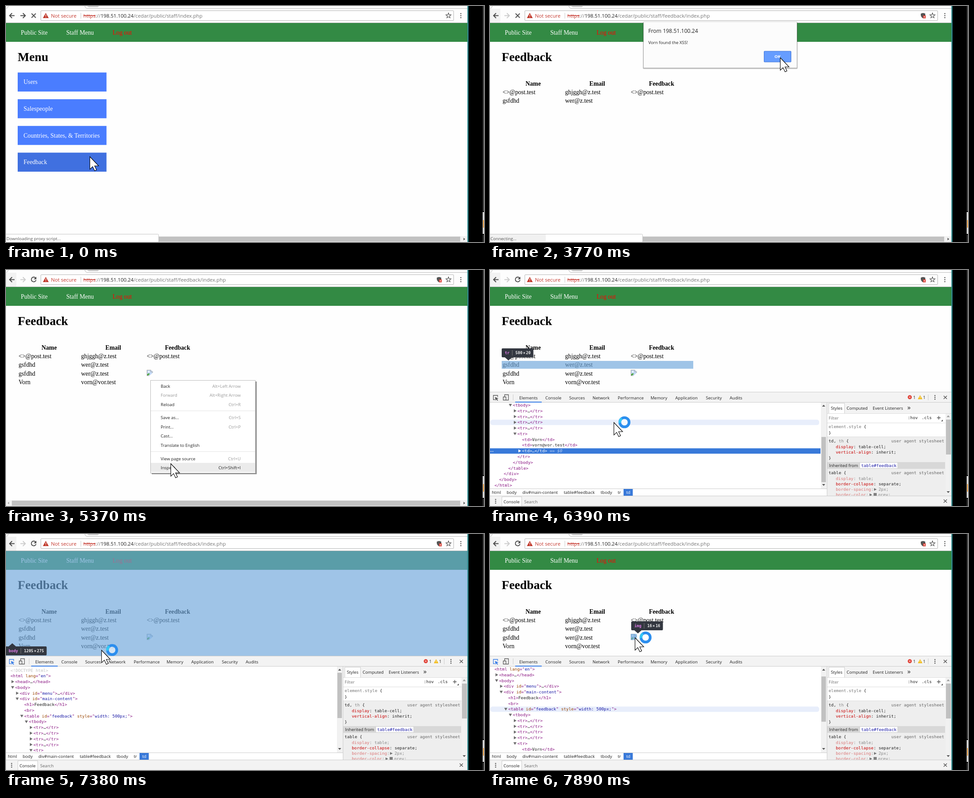
An HTML page that plays this animation: 1063 by 527 pixels, repeating every 8 s.

```html
<!DOCTYPE html>
<html lang="en">
<head>
<meta charset="utf-8">
<title>Staff feedback</title>
<style>
html, body { margin: 0; width: 100%; height: 100%; overflow: hidden; background: #fff; }
#stage { display: block; width: 1063px; height: 527px; }
text { font: 9.55px 'Open Sans', sans-serif; fill: #222; white-space: pre; }
.page { font: 13.63px 'Liberation Serif', serif; fill: #000; }
.head { font: bold 27.26px 'Liberation Serif', serif; fill: #000; }
.bold { font-weight: bold; }
.url { font-size: 11.25px; fill: #777; }
.mono { font: 9.3px 'DejaVu Sans Mono', monospace; }
.tip { font: bold 8.65px 'DejaVu Sans Mono', monospace; }
.tag { fill: #881280; }
.attr { fill: #994500; }
.val { fill: #1a1aa6; }
.prop { fill: #c80000; }
</style>
</head>
<body>
<svg id="stage" viewBox="0 0 1063 527"></svg>
<script>
const LOOP = 8000;
const HOST = '198.51.100.24';
const NAME = 'Vorn', MAIL = 'vorn@vor.test';

// x, y, w, h, tag, size, tooltip x, tooltip y, tooltip below
const MARK = {
  head: [26, 165, 426, 17.5, 'tr', '500×20', 26, 137],
  row: [26, 203, 426, 17.5, 'tr', '500×20', 26, 175],
  tbody: [26, 165, 426, 95, 'tbody', '500×111', 26, 137],
  table: [26, 163, 426, 99, 'table', '500×115', 26, 136],
  img: [313, 223, 13.6, 13.6, 'img', '16×16', 314, 195],
  body: [0, 38, 1026, 234, 'body', '1205×275', -1, 251, true]
};

// Each step changes some of the state and keeps the rest.
const STEPS = [
  [0, { at: [186, 336], menu: 1, loading: 1, status: 'Downloading proxy script...' }],
  [500, { status: 'Connecting...' }],
  [650, { menu: 0 }],
  [780, { dialog: 1 }],
  [1170, { at: [216, 325] }],
  [1330, { at: [578, 201] }],
  [1480, { at: [657, 159] }],
  [1630, { at: [660, 154] }],
  [1750, { at: [662, 150] }],
  [2700, { at: [652, 135] }],
  [2820, { at: [640, 118] }],
  [2940, { at: [633, 110] }],
  [3770, { at: [645, 115], okHover: 1 }],
  [3890, { dialog: 0 }],
  [4010, { at: [628, 125], loading: 0 }],
  [4130, { at: [530, 160] }],
  [4250, { at: [427, 198] }],
  [4410, { at: [321, 246], status: '' }],
  [4680, { context: 1 }],
  [4960, { at: [338, 325], item: 3 }],
  [5090, { at: [353, 376], item: 5 }],
  [5220, { at: [363, 429], item: 7 }],
  [5370, { at: [366, 432], item: 8 }],
  [5490, { at: [368, 435] }],
  [5630, { context: 0 }],
  [5910, { tools: 1 }],
  [6030, { at: [350, 420], tools: 2, busy: 1, scroll: 117.4 }],
  [6150, { at: [318, 385] }],
  [6270, { at: [290, 354] }],
  [6390, { at: [275, 340], hover: 12, mark: 'row' }],
  [6540, { at: [250, 314], hover: 10, mark: 'head' }],
  [6700, { at: [165, 403], hover: 19, mark: 'tbody' }],
  [6840, { at: [62, 316], hover: -1, mark: '' }],
  [6990, { at: [18, 290], idle: 1 }],
  [7120, { at: [12, 285], pick: 1 }],
  [7260, { at: [150, 268], scroll: 0, mark: 'body' }],
  [7380, { at: [212, 259] }],
  [7500, { at: [262, 246] }],
  [7620, { at: [302, 236], mark: 'table' }],
  [7740, { at: [318, 232], scroll: 15.3, hover: 8 }],
  [7890, { at: [322, 231], mark: 'img' }]
];

// level, arrow (1 closed, 2 open), markup
const TREE = [
  [0, 0, '<!DOCTYPE html>'], [0, 0, '<html lang="en">'], [1, 1, '<head>…</head>'], [1, 2, '<body>'],
  [2, 1, '<div id="menu">…</div>'], [2, 2, '<div id="main-content">'], [3, 0, '<h1>Feedback</h1>'],
  [3, 0, '<br>'], [3, 2, '<table id="feedback" style="width: 500px;">'], [4, 2, '<tbody>'],
  ...Array(4).fill([5, 1, '<tr>…</tr>']), [5, 2, '<tr>'],
  [6, 0, `<td>${NAME}</td>`], [6, 0, `<td>${MAIL}</td>`], [6, 1, '<td>…</td>'],
  [5, 0, '</tr>'], [4, 0, '</tbody>'], [3, 0, '</table>'], [2, 0, '</div>'], [1, 0, '</body>'], [0, 0, '</html>']
];
const SELECTED = 17;

const MENU_ITEMS = [
  ['Back', 'Alt+Left Arrow', 259], ['Forward', 'Alt+Right Arrow', 279.5], ['Reload', 'Ctrl+R', 300],
  ['Save as...', 'Ctrl+S', 329.5], ['Print...', 'Ctrl+P', 350], ['Cast...', '', 370.5],
  ['Translate to English', '', 391], ['View page source', 'Ctrl+U', 421], ['Inspect', 'Ctrl+Shift+I', 441]
];

const esc = s => s.replace(/&/g, '&amp;').replace(/</g, '&lt;').replace(/>/g, '&gt;');
const raw = (x, y, html, more = '') => `<text x="${x}" y="${y}" ${more}>${html}</text>`;
const text = (x, y, s, more) => raw(x, y, esc(s), more);
const rect = (x, y, w, h, fill, more = '') => `<rect x="${x}" y="${y}" width="${w}" height="${h}" fill="${fill}" ${more}/>`;
const fillPath = (d, fill, more = '') => `<path d="${d}" fill="${fill}" ${more}/>`;
const line = (d, color, w = 1) => `<path d="${d}" fill="none" stroke="${color}" stroke-width="${w}"/>`;
const dot = (x, y, r, fill) => `<circle cx="${x}" cy="${y}" r="${r}" fill="${fill}"/>`;
const dots = (x, y, gap) => [-gap, 0, gap].map(d => dot(x, y + d, 1.3, '#555')).join('');
const cross = (x, y, r, w) => line(`M${x - r} ${y - r}l${2 * r} ${2 * r}m0 ${-2 * r}l${-2 * r} ${2 * r}`, '#555', w);
const clip = (x, y, w, h, html) =>
  `<svg x="${x}" y="${y}" width="${w}" height="${h}" viewBox="${x} ${y} ${w} ${h}">${html}</svg>`;

function toolbar(s) {
  const path = '/cedar/public/staff/' + (s.menu ? '' : 'feedback/') + 'index.php';
  let star = '';
  for (let i = 0; i < 10; i++) {
    const a = i * Math.PI / 5, r = i % 2 ? 2.6 : 6;
    star += `${i ? 'L' : 'M'}${984 + r * Math.sin(a)} ${21.5 - r * Math.cos(a)}`;
  }
  return rect(0, 0, 1027, 38, '#fdfdfd') +
    (s.menu ? '' : rect(0, 6, 23, 31, '#f2f2f2')) +
    line('M1 5.5Q4 5 5 0M175 0Q177 5.5 180 5.5H1026', '#bbb') +
    fillPath('M180 0H207L204 2.5H184Z', '#ccc') + line('M0 37.5H1026', '#bbb') +
    line('M19 21.5H8.5M13.5 16L8 21.5L13.5 27', '#4a4a4a', 2) +
    line('M32 21.5H42.5M37.5 16L43 21.5L37.5 27', s.menu ? '#4a4a4a' : '#ccc', 2) +
    (s.loading ? cross(61.5, 21.5, 4.7, 2)
      : line('M66 18A5.3 5.3 0 1 0 66.8 22.5', '#4a4a4a', 1.9) + fillPath('M67.5 15V20.8H61.7Z', '#4a4a4a')) +
    rect(77.5, 10.5, 918, 22, '#fff', 'stroke="#b6b6b6" rx="1.5"') +
    fillPath('M88.5 15.5L95 27H82Z', '#c0392b') + rect(88, 19, 1.2, 4, '#fff') + rect(88, 24, 1.2, 1.3, '#fff') +
    text(100, 25.5, 'Not secure', 'class="url" style="fill:#c5392f"') + line('M166.5 15V28', '#ccc') +
    raw(172, 25.5, `<tspan fill="#c5392f" text-decoration="line-through">https</tspan>://<tspan fill="#222">${HOST}</tspan>${path}`, 'class="url"') +
    line(star + 'Z', '#555', 1.2) + dots(1011.5, 21.5, 4.5) +
    (s.menu ? '' : fillPath('M958 17L963 15.5L968 17V21Q967 25 963 27.5Q959 25 958 21Z', '#555') +
      rect(963, 21, 6, 6.5, '#d93a2f') + line('M964.5 22.7l3 3m0 -3l-3 3', '#fff'));
}

function menuPage() {
  return text(26, 123, 'Menu', 'class="head"') +
    ['Users', 'Salespeople', 'Countries, States, & Territories', 'Feedback'].map((label, i) => {
      const y = 148.5 + i * 59.65;
      return rect(26, y, 197.5, 42.5, i == 3 ? '#4070e0' : '#4a7dff') +
        text(39, y + 25.8, label, 'class="page" style="fill:#fff"');
    }).join('');
}

function brokenImage(x, y) {
  return rect(x + .5, y + .5, 12.5, 12.5, '#c3d9f5', 'stroke="#a5a5a5"') +
    fillPath(`M${x + 1} ${y + 12.5}V${y + 10}Q${x + 4} ${y + 6} ${x + 7} ${y + 9}L${x + 3} ${y + 12.5}Z`, '#4fa53c') +
    dot(x + 4.5, y + 4, 1.6, '#fff') + fillPath(`M${x + 5} ${y + 14}L${x + 14} ${y + 6}V${y + 14}Z`, '#fff') +
    fillPath(`M${x + 9} ${y}H${x + 14}V${y + 4.5}Z`, '#fff') + line(`M${x + 9} ${y}V${y + 4.5}H${x + 13.5}`, '#a5a5a5');
}

function feedbackPage(s) {
  const rows = [['<>@post.test', 'ghjggh@z.test', '<>@post.test'], ['gsfdhd', 'wer@z.test', '']];
  if (!s.loading) rows.push(['gsfdhd', 'wer@z.test', ''], [NAME, MAIL, '']);
  const heads = [['Name', 96], ['Email', 238.5], ['Feedback', 381.5]];
  return text(26, 123, 'Feedback', 'class="head"') +
    heads.map(([label, x]) => text(x, 178, label, 'class="page bold" text-anchor="middle"')).join('') +
    rows.map((row, i) => row.map((cell, c) => text([28, 167, 313][c], 197 + i * 19.3, cell, 'class="page"')).join('')).join('') +
    (s.loading ? '' : brokenImage(313, 223));
}

function page(s) {
  const nav = [['Public Site', 33, '#fff'], ['Staff Menu', 134, '#fff'], ['Log out', 237, '#f00']];
  return rect(0, 38, 1026, 489, '#fefefe') + rect(0, 38, 1026, 42, '#338a44') +
    nav.map(([label, x, c]) => text(x, 64, label, `class="page" style="fill:${c}"`)).join('') +
    (s.menu ? menuPage() : feedbackPage(s)) +
    rect(0, 514, 1026, 13, '#f1f1f1') + rect(13, 515, 997, 11, '#c1c1c1') +
    fillPath('M7 517.5V523.5L3.5 520.5Z', '#aaa') + fillPath('M1017.5 517.5V523.5L1021 520.5Z', '#505050') +
    (s.status ? rect(-1.5, 509.5, 341, 20, '#fff', 'stroke="#c4c4c4" rx="2"') +
      (s.status[0] == 'C' ? rect(0, 510, 124, 15, '#f1f1f1') : '') +
      text(1, 523, s.status, 'style="fill:#555"') : '');
}

function dialog(s) {
  return rect(340, 36, 344, 104.5, '#000', 'opacity=".28" rx="2"') +
    rect(341.5, 35, 341, 103, '#fcfcfc', 'stroke="#c4c4c4" stroke-width=".8" rx="1"') +
    text(352, 60, 'From ' + HOST, 'style="font-size:12px"') +
    text(352, 85, NAME + ' found the XSS!') +
    rect(609.5, 101, 60, 24, s.okHover ? '#669dff' : '#5a95fd', 'stroke="#3c72d6" rx="1"') +
    text(639.5, 116, 'OK', 'class="bold" text-anchor="middle" style="fill:#fff"');
}

function contextMenu(s) {
  return rect(324, 249, 233.5, 207, '#000', 'opacity=".45"') +
    rect(321.5, 246.5, 233, 207, '#fff', 'stroke="#bababa"') +
    line('M322 314.5H554M322 405.5H554', '#e4e4e4') +
    MENU_ITEMS.map(([label, keys, y], i) => {
      const on = s.item == i;
      return (on ? rect(322, y - 10.3, 232, 20.4, '#ebebeb') : '') +
        text(344, y + 3.6, label, i == 1 ? 'style="fill:#999"' : '') +
        text(522, y + 3.6, keys, `text-anchor="end" style="fill:${on ? '#222' : '#999'}"`);
    }).join('');
}

function highlight([x, y, w, h, tag, size, tx, ty, below]) {
  const sep = tx + 13 + tag.length * 5.25;
  const [a, b] = size.split('×');
  const width = sep - tx + 21 + (a.length + b.length) * 5.2;
  const base = below ? ty : ty + 20, tip = below ? ty - 7 : ty + 27;
  return rect(x, y, w, h, '#6fa8dc', 'opacity=".66"') +
    rect(tx, ty, width, 20, '#333740', 'rx="2"') +
    fillPath(`M${tx + 7} ${base}H${tx + 23}L${tx + 15} ${tip}Z`, '#333740') +
    text(tx + 7, ty + 13, tag, 'class="tip" style="fill:#e07be8"') + line(`M${sep} ${ty + 4}V${ty + 16}`, '#777') +
    raw(sep + 7, ty + 13, `${a}<tspan dx="1.4">×</tspan><tspan dx="1.4">${b}</tspan>`, 'class="tip" style="fill:#eee"');
}

const markup = s => s.split(/(<[^>]*>)/).map(part => part[0] != '<' ? esc(part)
  : `<tspan class="tag">${esc(part).replace(/(\w+)="([^"]*)"/g,
    '<tspan class="attr">$1</tspan>="<tspan class="val">$2</tspan>"')}</tspan>`).join('');

function tree(s) {
  const rows = TREE.map(([level, arrow, code], i) => {
    const y = 304.5 + 12.77 * i - s.scroll, x = 10 + 10.2 * level;
    const active = i == SELECTED && !s.idle;
    let out = i == s.hover ? rect(1, y - 6, 731, 12, '#e8eefb', 'rx="5"') : '';
    if (i == SELECTED) out += rect(0, y - 6, 735, 12, active ? '#3879d9' : '#dadada') +
      text(0, y + 2, '...', `class="bold" style="fill:${active ? '#fff' : '#555'}"`);
    const color = active ? '#fff' : '#6e6e6e';
    if (arrow == 1) out += fillPath(`M${x - 8} ${y - 3.7}V${y + 3.3}L${x - 2} ${y - .2}Z`, color);
    if (arrow == 2) out += fillPath(`M${x - 9} ${y - 3}H${x - 2}L${x - 5.5} ${y + 3}Z`, color);
    const plain = active || code[1] == '!';
    let html = plain ? esc(code) : markup(code);
    if (i == SELECTED) html += `<tspan font-style="italic" fill="${active ? '#b9d0f2' : '#888'}"> == $0</tspan>`;
    return out + raw(x, y + 3, html, `class="mono" ${plain ? `style="fill:${active ? '#fff' : '#c0c0c0'}"` : ''}`);
  }).join('');
  return clip(0, 296, 749, 192, rows + rect(736, 296, 13, 192, '#f1f1f1') +
    rect(737, 310 + s.scroll * .535, 10, 101, '#c1c1c1') +
    fillPath('M738.5 305H745.5L742 301Z', '#555') + fillPath('M738.5 478H745.5L742 482Z', '#555'));
}

function styles() {
  const prop = (y, name, value, faded) =>
    raw(769, y, `<tspan class="prop">${name}</tspan>: ${value};`, `class="mono" ${faded ? 'opacity=".5"' : ''}`);
  const mono = (x, y, s, more = '') => text(x, y, s, 'class="mono" ' + more);
  const agent = y => mono(1010, y, 'user agent stylesheet', 'text-anchor="end" style="fill:#666"');
  const tri = y => fillPath(`M854 ${y - 3}V${y + 3}L860 ${y}Z`, '#777');
  const rules = rect(750, 372, 263, 132, '#eee') + line('M750 372.5H1013', '#ddd') +
    raw(753, 353, '<tspan fill="#777">element.style</tspan> {', 'class="mono"') + mono(753, 367, '}') +
    raw(753, 385, 'td, <tspan fill="#888">th</tspan> {', 'class="mono"') + agent(385) +
    prop(398, 'display', 'table-cell') + prop(410, 'vertical-align', 'inherit') + mono(753, 423, '}') +
    rect(750, 429, 262, 15, '#d8d8d8') + text(754, 440, 'Inherited from') +
    rect(822.5, 430, 84, 13, '#fff', 'stroke="#ccc" stroke-width=".7"') +
    mono(825.5, 440, 'table#feedback', 'style="fill:#1a1aa6"') +
    mono(753, 456, 'table {') + agent(456) +
    prop(469, 'display', 'table', true) + prop(481, 'border-collapse', 'separate') +
    raw(769, 493, '<tspan class="prop">border-spacing</tspan>:<tspan x="864">2px;</tspan>', 'class="mono" opacity=".5"') + tri(490) +
    raw(769, 505, '<tspan class="prop">border-color</tspan>:<tspan x="863">grey;</tspan>', 'class="mono" opacity=".5"') +
    fillPath('M844 499V505L850 502Z', '#777') + rect(853, 498, 7, 7, '#808080') +
    rect(1013, 320, 13, 184, '#f1f1f1') + rect(1014, 334, 11, 78, '#c1c1c1') +
    fillPath('M1015.5 494H1022.5L1019 498Z', '#555');
  return rect(750, 296, 276, 24, '#f3f3f3') + rect(753.5, 297.5, 35, 23, '#fff', 'stroke="#ccc"') +
    text(758, 312, 'Styles') + text(793, 312, 'Computed') + text(851, 312, 'Event Listeners') +
    text(928, 312, '»', 'style="font-size:15px"') +
    text(753, 334, 'Filter', 'style="fill:#777"') + mono(929, 333, ':hov') + mono(960, 333, '.cls') +
    line('M994 330H1002M998 326V334', '#555', 1.4) + fillPath('M1007 334V338H1003Z', '#555') +
    line('M750 320.5H1026M750 341.5H1013', '#ddd') +
    clip(750, 342, 276, 162, rules) + rect(1013, 321, 13, 21, '#f1f1f1') +
    rect(1014, 334, 11, 8, '#c1c1c1') + fillPath('M1015.5 328.5H1022.5L1019 324.5Z', '#999');
}

function devtools(s) {
  const tabs = { Elements: 65, Console: 123, Sources: 176, Network: 228, Performance: 284,
    Memory: 357, Application: 412, Security: 480, Audits: 533 };
  const crumbs = { html: 4, body: 37, 'div#main-content': 72, 'table#feedback': 164, tbody: 246, tr: 284, td: 303 };
  const row = (items, y) => Object.entries(items).map(([label, x]) =>
    text(x, y, label, label == 'td' ? 'style="fill:#fff"' : '')).join('');
  const pick = s.pick ? '#3b7fe8' : '#5a5a5a';
  const shell = rect(0, 272, 1026, 255, '#fff') + rect(0, 272, 1026, 24, '#f3f3f3') +
    line('M0 272.5H1026M0 295.5H1026', '#ccc');
  if (s.tools == 1) return shell;
  return shell +
    line('M11 289.5H7.5V280H17V283.5', pick, 1.3) + fillPath('M11 283.5L19 287L15.5 288L18 291L16.5 292L14 289L12.5 292Z', pick) +
    line('M32.5 283V278.5H41V290.5H36M29.5 283.5H35.5V290.5H29.5Z', '#5a5a5a', 1.3) + line('M51.5 278V291', '#ccc') +
    row(tabs, 288.5) + rect(56, 294, 59, 2, '#3b7fe8') +
    dot(933.5, 284, 4.5, '#e03c31') + line('M931.7 282.2l3.6 3.6m0 -3.6l-3.6 3.6', '#fff') + text(941, 288, '1') +
    fillPath('M956.5 279.5L961.5 288.5H951.5Z', '#f2b90f') + rect(956, 282.5, 1, 4, '#fff') + text(963, 288, '1') +
    line('M974.5 278V291', '#ccc') + dots(989.5, 284.5, 4) + cross(1012.5, 284.5, 3.6, 1.4) +
    tree(s) + styles() + line('M749.5 296V504', '#ccc') +
    line('M0 488.5H749M0 504.5H1026', '#ccc') + rect(297, 489, 20.5, 15, '#3879d9') + row(crumbs, 500) +
    rect(0, 505, 1026, 22, '#f3f3f3') + dots(12.5, 516.5, 4) +
    rect(26.5, 506.5, 44, 24, '#fff', 'stroke="#ccc"') + text(30, 520.5, 'Console') +
    text(76, 520.5, 'Search', 'style="fill:#666"') + cross(1012.5, 516, 3.6, 1.4);
}

function pointer(s) {
  const [x, y] = s.at;
  const ring = `<circle cx="24" cy="0" r="10.3" fill="#fff" fill-opacity=".55" stroke="#2c8eee" stroke-width="6"/>` +
    line('M13.8 1.5A10.3 10.3 0 0 1 18 -8.4', '#35c8f5', 5.4);
  return `<g transform="translate(${x} ${y})">${s.busy ? ring : ''}` +
    fillPath('M.5 .5V28.5L6.7 22.6L11.2 32L15.4 30L11 21H20Z', '#fff', 'stroke="#000" stroke-width="1.1"') + '</g>';
}

function desktop() {
  return rect(1026, 0, 37, 527, '#000') + rect(1026.5, 0, 1.7, 527, '#45c9cf') +
    rect(1060.5, 0, 2.5, 458, '#4a4a4a') + rect(1060, 460, 3, 49, '#d8d8d8') +
    rect(1061, 478, 2, 17, '#e89a3c') + rect(1060, 511, 3, 16, '#333');
}

const draw = s => toolbar(s) + page(s) + (s.mark ? highlight(MARK[s.mark]) : '') +
  (s.dialog ? dialog(s) : '') + (s.context ? contextMenu(s) : '') +
  (s.tools ? devtools(s) : '') + desktop() + pointer(s);

let state = { scroll: 0, hover: -1, item: -1 };
const scenes = STEPS.map(([, change]) => draw(state = { ...state, ...change }));
const stage = document.getElementById('stage');
const start = performance.now();
let shown = -1;

function tick() {
  const t = (performance.now() - start) % LOOP;
  let i = STEPS.length - 1;
  while (STEPS[i][0] > t) i--;
  if (i != shown) stage.innerHTML = scenes[shown = i];
  requestAnimationFrame(tick);
}
tick();
</script>
</body>
</html>
```
